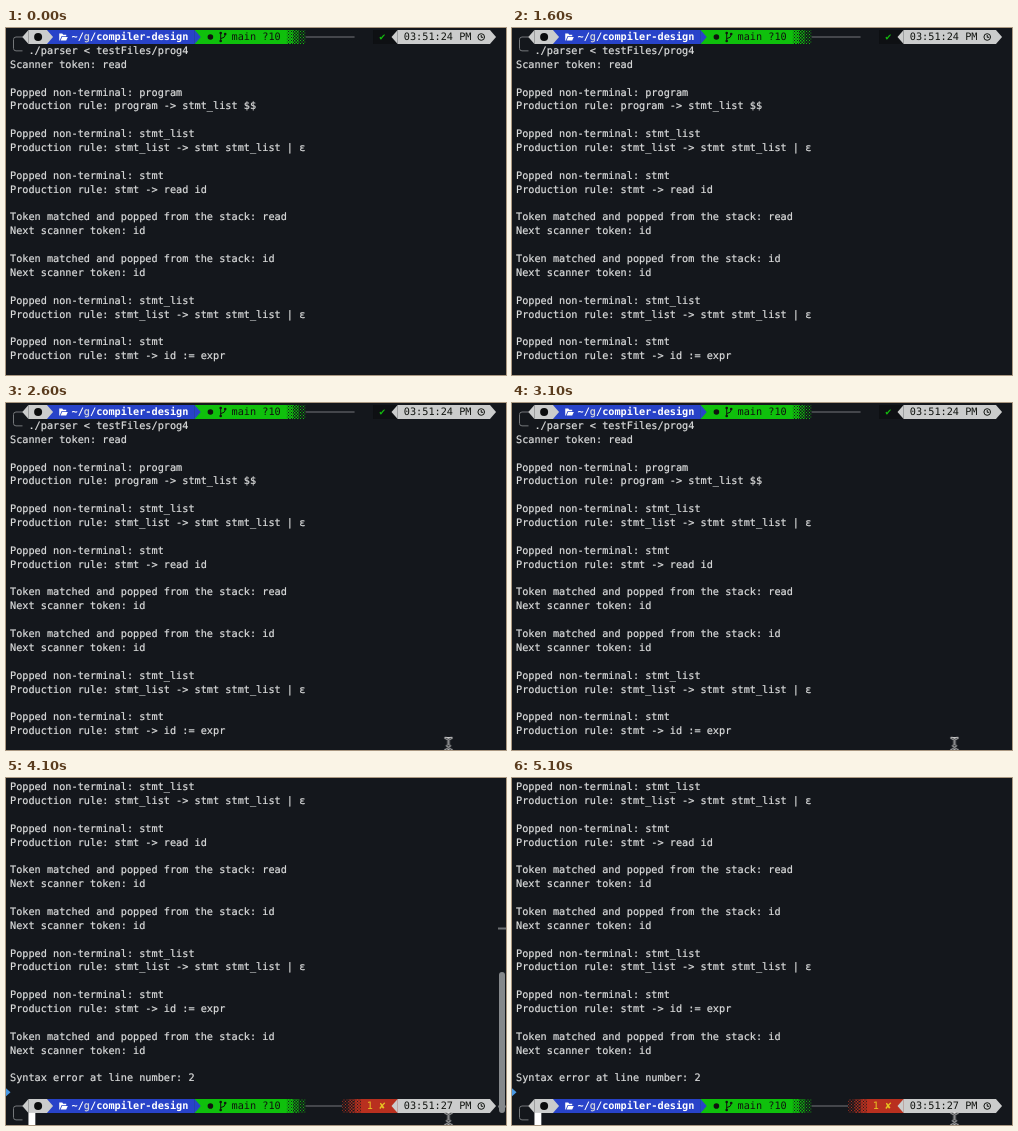
An HTML page for the animation above (5.6 s loop, 500x347 px).

```html
<!DOCTYPE html>
<html lang="en">
<head>
<meta charset="utf-8">
<title>Parser run</title>
<style>
  html, body { margin: 0; width: 100%; height: 100%; overflow: hidden; background: #14171c; }
  svg { display: block; width: 500px; height: 347px; }
  text {
    font: 10.22px "DejaVu Sans Mono", "Liberation Mono", monospace;
    fill: #dcdddd; stroke: #dcdddd; stroke-width: .2; white-space: pre;
    text-rendering: geometricPrecision;
  }
  .bold { font-weight: 700; fill: #fff; stroke: none; }
  .dark { fill: #10130f; stroke: none; }
  .ok { fill: #14b80f; stroke: none; }
  .error { fill: #e6c322; stroke: none; }
  .frame { fill: none; stroke: #74777a; stroke-width: 1; }
  .ink { fill: none; stroke: #10130f; stroke-width: 1; }

  #log, #mouse, .bar, #ruler { animation: 5600ms step-end infinite; }
  #log { animation-name: scroll; }
  #mouse { animation-name: mouse; }
  #ruler { animation-name: ruler; }
  #bar1 { animation-name: bar1; }
  #bar2 { animation-name: bar2; }

  @keyframes scroll {
    0% { transform: translateY(0); }
    64.2857% { transform: translateY(-69.35px); }
    73.2143%, 100% { transform: translateY(-97.09px); }
  }
  @keyframes mouse {
    0% { transform: translate(229.5px, 283px); visibility: hidden; }
    1.7857% { transform: translate(229.5px, 283px); visibility: visible; }
    28.5714% { transform: translate(229.5px, 283px); visibility: hidden; }
    37.5% { transform: translate(420.5px, 332px); visibility: visible; }
    46.4286%, 100% { transform: translate(442.5px, 341px); visibility: visible; }
  }
  @keyframes ruler {
    0% { visibility: hidden; }
    64.2857% { visibility: visible; }
    82.1429%, 100% { visibility: hidden; }
  }
  @keyframes bar1 {
    0% { visibility: hidden; }
    64.2857% { visibility: visible; }
    73.2143%, 100% { visibility: hidden; }
  }
  @keyframes bar2 {
    0% { visibility: hidden; }
    73.2143% { visibility: visible; }
    82.1429%, 100% { visibility: hidden; }
  }
</style>
</head>
<body>
<svg viewBox="0 0 500 347">
  <defs>
    <path id="beam" d="M-3-6Q-.4-6 0-4.4Q.4-6 3-6M0-4.4V4.4M-3 6Q-.4 6 0 4.4Q.4 6 3 6M-1.3 1.8H1.3"/>
  </defs>
  <defs id="shades"></defs>
  <g id="log"></g>
  <g id="ruler" fill="#6d7073">
    <rect x="492" y="149.5" width="8" height="2"/>
    <rect x="492" y="327.5" width="8" height="2"/>
  </g>
  <rect id="bar1" class="bar" x="493" y="181" width="6" height="154" rx="3" fill="#85888b"/>
  <rect id="bar2" class="bar" x="493" y="194" width="6" height="141" rx="3" fill="#85888b"/>
  <g id="mouse" fill="none" stroke-linecap="round">
    <use href="#beam" stroke="#e4e4e4" stroke-width="2.3"/>
    <use href="#beam" stroke="#1a1c20" stroke-width=".9"/>
  </g>
</svg>
<script>
const CELL = 6.153, LINE = 13.87, H = 14;
const PILL = '#cbcccc', BLUE = '#2843c9', GREEN = '#0fc00c', RED = '#b9301f', BLACK = '#0e1013', BG = '#14171c';
const col = c => 4 + c * CELL;
const mid = r => 9 + r * LINE;

const text = (c, r, s, cls = '') =>
  `<text class="${cls}" x="${col(c)}" y="${mid(r) + 3.1}">${s.replace(/</g, '&lt;')}</text>`;
const block = (c0, c1, r, fill) =>
  `<rect x="${col(c0)}" y="${mid(r) - H / 2}" width="${(c1 - c0) * CELL + .1}" height="${H}" fill="${fill}"/>`;
// Triangle one cell wide, dir 1 points right, -1 points left.
const tip = (c, r, dir, fill) => {
  const base = col(dir > 0 ? c : c + 1), y = mid(r);
  return `<path d="M${base} ${y - H / 2}l${dir * CELL} ${H / 2}l${-dir * CELL} ${H / 2}z" fill="${fill}"/>`;
};

// Dotted shades from dense (0) to sparse (2).
const shade = (name, color) => [0, 1, 2].map(i => {
  const [back, dot, s] = i ? [BG, color, i > 1 ? 1 : 1.4] : [color, BG, 1];
  return `<pattern id="${name}${i}" width="3" height="3" patternUnits="userSpaceOnUse">
    <rect width="3" height="3" fill="${back}"/>
    <path d="M0 0h${s}v${s}h-${s}zM1.5 1.5h${s}v${s}h-${s}z" fill="${dot}"/></pattern>`;
}).join('');
shades.innerHTML = shade('green', GREEN) + shade('red', RED);

function prompt(r, time, failed) {
  const y = mid(r), at = (c, s) => `<g transform="translate(${col(c)} ${y})">${s}</g>`;
  const status = failed ? 54 : 56;
  let s = `<path class="frame" d="M17 ${y}H10Q7.5 ${y} 7.5 ${y + 2.5}V${y + LINE - 2.5}Q7.5 ${y + LINE} 10 ${y + LINE}H16.5"/>`;
  s += `<path class="frame" d="M${col(48)} ${y}H${col(status)}"/>`;
  s += block(30, 45, r, GREEN) + block(6, 30, r, BLUE) + tip(30, r, 1, BLUE);
  s += tip(2, r, -1, PILL) + block(3, 6, r, PILL) + tip(6, r, 1, PILL);
  s += at(4, '<circle cx="3.5" r="4" fill="#0b0c0d"/>');
  s += at(8, '<path d="M0 3.5V-3.5H3L4-2.3H7V-.8H2.2L.6 3.5zM2.8 0H8.6L7 3.5H1.4z" fill="#fff"/>');
  s += text(10, r, '~/', 'bold') + text(12, r, 'g') + text(13, r, '/compiler-design', 'bold');
  s += at(32, '<circle cx="3.5" r="2.8" class="dark"/>');
  s += at(34, `<path class="ink" d="M1.5-3V3M6-2Q6 .8 1.5 1.6"/>
    <g class="dark"><circle cx="1.5" cy="-4" r="1.3"/><circle cx="1.5" cy="4" r="1.3"/><circle cx="6" cy="-3" r="1.3"/></g>`);
  s += text(36, r, 'main ?10', 'dark');
  for (let i = 0; i < 3; i++) {
    s += block(45 + i, 46 + i, r, `url(#green${i})`);
    if (failed) s += block(status + i, status + i + 1, r, `url(#red${2 - i})`);
  }
  s += block(status + 3, 63, r, failed ? RED : BLACK);
  s += failed ? text(58, r, '1 ✘', 'error') : text(60, r, '✔', 'ok');
  s += tip(62, r, -1, PILL) + block(63, 78, r, PILL) + tip(78, r, 1, PILL) + text(64, r, time, 'dark');
  return s + at(76, '<circle class="ink" cx="3.6" r="3.3"/><path class="ink" d="M3.6-2V.3H5.5"/>');
}

const pop = (name, rule) => ['Popped non-terminal: ' + name, `Production rule: ${name} -> ${rule}`, ''];
const match = name => [`Token matched and popped from the stack: ${name}`, 'Next scanner token: id', ''];
const list = pop('stmt_list', 'stmt stmt_list | ε');
const lines = [
  'Scanner token: read', '',
  ...pop('program', 'stmt_list $$'), ...list, ...pop('stmt', 'read id'),
  ...match('read'), ...match('id'), ...list, ...pop('stmt', 'id := expr'),
  ...match('id'), 'Syntax error at line number: 2'
];

log.innerHTML = prompt(0, '03:51:24 PM') + text(3, 1, './parser < testFiles/prog4')
  + lines.map((s, i) => text(0, i + 2, s)).join('')
  + `<path d="M0 ${mid(29) - 4}l4.5 4l-4.5 4z" fill="#4a9ae6"/>`
  + prompt(30, '03:51:27 PM', true) + block(3, 4.1, 31, '#fff');
</script>
</body>
</html>
```
